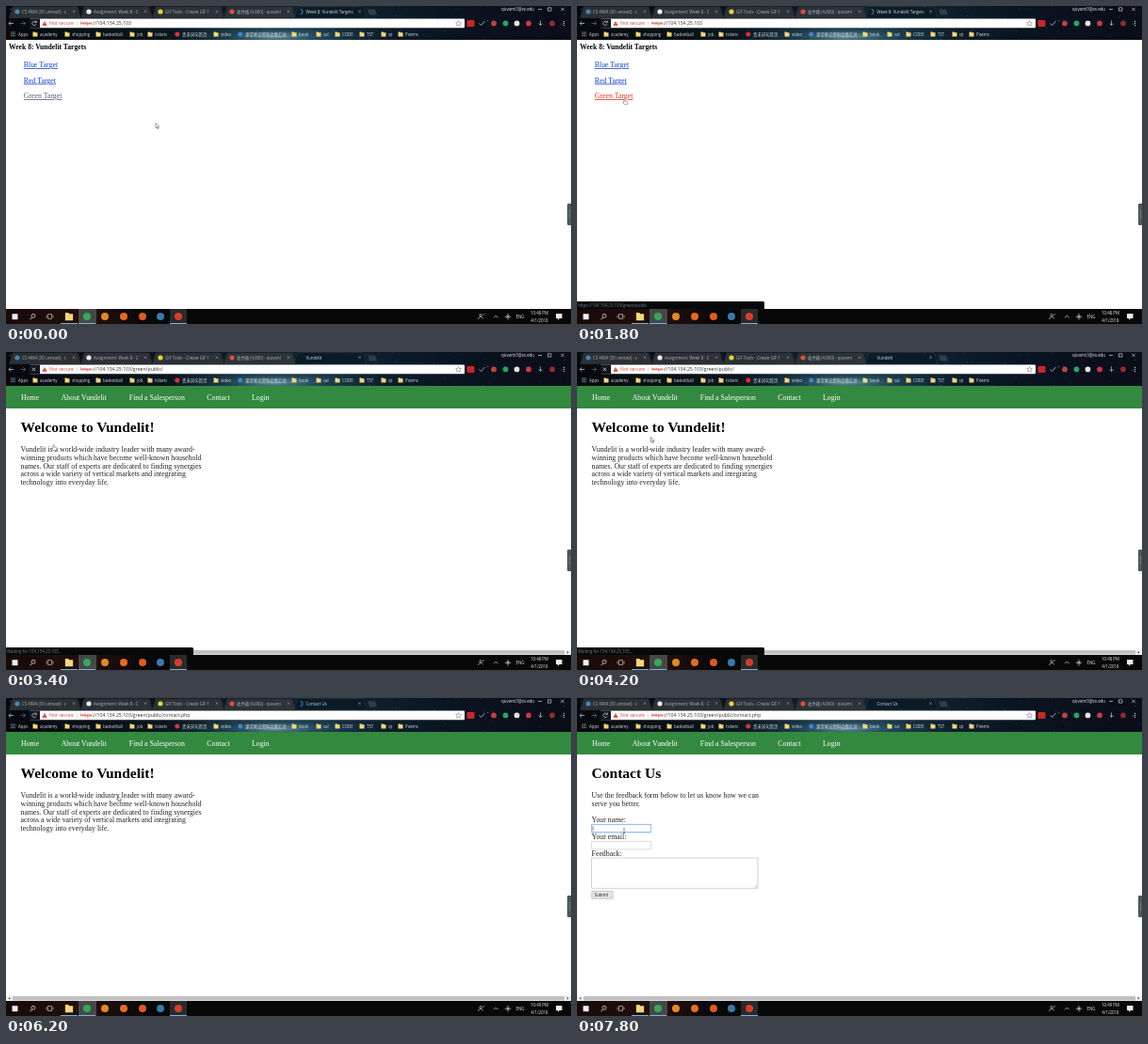
These frames come from a looping animation (600x338 px, 8000 ms). An HTML page:

```html
<!DOCTYPE html>
<html lang="en">
<head>
<meta charset="utf-8">
<title>Browser session</title>
<style>
html, body { margin: 0; width: 100%; height: 100%; overflow: hidden; background: #fff; }
svg { display: block; width: 100%; height: 100%; }
text { white-space: pre; }
.ui { font: 4.4px "Open Sans", "Noto Sans CJK SC", "Noto Sans CJK", sans-serif; }
.url { font-size: 5.15px; }
.serif { font: 7.82px "Liberation Serif", serif; fill: #222; }
.bold { font-weight: bold; fill: #000; }
.h1 { font-size: 15.5px; }
</style>
</head>
<body>
<svg id="stage" viewBox="0 0 600 338" preserveAspectRatio="none"></svg>
<script>
const LOOP = 8000, STEP = 200;
const BRAND = 'Vundelit', HOST = '104.154.25.103';
const stage = document.getElementById('stage');

const rect = (x, y, w, h, fill, more = '') =>
  `<rect x="${x}" y="${y}" width="${w}" height="${h}" fill="${fill}" ${more}/>`;
const dot = (x, y, r, fill, more = '') => `<circle cx="${x}" cy="${y}" r="${r}" fill="${fill}" ${more}/>`;
const line = (d, stroke, w = .7, more = '') =>
  `<path d="${d}" fill="none" stroke="${stroke}" stroke-width="${w}" ${more}/>`;
const label = (x, y, str, fill = '#d5d9dc', cls = 'ui', more = '') =>
  `<text x="${x}" y="${y}" class="${cls}" style="fill:${fill}" ${more}>${str}</text>`;
const serif = (x, y, str, cls = '', more = '') =>
  `<text x="${x}" y="${y}" class="serif ${cls}" ${more}>${str}</text>`;
const folder = (x, y, s = 1) =>
  `<path transform="translate(${x} ${y}) scale(${s})" d="M-2.5-2.5h2l.7.8h2.3v4.2h-5z" fill="#f3d77c"/>`;
const cross = (x, y, r, color, w = .6) =>
  line(`M${x - r} ${y - r}l${2 * r} ${2 * r}m0 ${-2 * r}l${-2 * r} ${2 * r}`, color, w);

let seed = 11;
const random = () => (seed = seed * 16807 % 2147483647) / 2147483647;

function sky() {
  let out = rect(0, 0, 600, 36, 'url(#night)') + rect(180, 0, 250, 36, 'url(#glow)');
  for (let i = 0; i < 130; i++)
    out += dot((random() * 600).toFixed(1), (random() * 36).toFixed(1),
      (.15 + random() * .4).toFixed(2), '#a9cfe0', `opacity="${(.2 + random() * .6).toFixed(2)}"`);
  return out;
}

function tabs() {
  const items = [
    ['CS 4984 (30 unread) - c', '#4a83b5'],
    ['Assignment: Week 8 - C', '#eeeeee'],
    ['GIF Tools - Create GIF f', '#e8d33c'],
    ['收件箱 (4,800) - quvami', '#d9503f']
  ];
  const shape = x => `M${x} 13l3.5-11.5q.4-1 1.5-1h67q1.1 0 1.5 1l3.5 11.5z`;
  return items.map(([title, color], i) => {
    const x = 3 + i * 76;
    return `<path d="${shape(x)}" fill="#30363b" fill-opacity=".88" stroke="#15191d" stroke-width=".5"/>` +
      dot(x + 9, 6, 2.6, color) + label(x + 14, 7.6, title, '#aeb4b7') + cross(x + 69, 5.8, 1.3, '#a5aaae', .5);
  }).join('') +
    `<path d="${shape(306)}" fill="#0b1a25" fill-opacity=".85" stroke="#34444e" stroke-width=".4"/>` +
    cross(375.5, 5.8, 1.3, '#aeb8be', .5) +
    `<path d="M384 3.5h8l2 6h-8z" fill="#49545b" opacity=".6"/>`;
}

function toolbar() {
  const badges = [[518, '#b5473f'], [530.5, '#27a463'], [542.5, '#e4e4e4'], [555, '#c83a45'], [580, '#8d2d35']];
  return label(526, 4.8, 'quvami3@zx.edu', '#eee') +
    line('M565 3.5h4M575.5 1.8h3.4v3.4h-3.4z', '#eee', .6) + cross(591, 3.5, 1.7, '#eee') +
    line('M8 18.5h-5m2.2-2.2l-2.2 2.2 2.2 2.2', '#cfd4d8') +
    line('M15.5 18.5h5m-2.2-2.2l2.2 2.2-2.2 2.2', '#6c747a') +
    rect(25, 13.5, 462, 9.8, '#fff', 'rx="1"') + rect(25, 13.5, 11, 9.8, '#10171d') +
    '<path d="M41 16l2.7 4.7h-5.4z" fill="#d23b30"/>' + line('M41 17.6v1.5', '#fff', .5) +
    label(46, 20.3, 'Not secure', '#d0453a', 'ui url') + line('M75.5 16v5', '#aaa', .4) +
    '<path d="M480.500 15.500l.9 2 2.100.2-1.600 1.400.5 2.100-1.900-1.100-1.900 1.100.5-2.100-1.600-1.400 2.100-.2z" fill="none" stroke="#666" stroke-width=".5"/>' +
    rect(489.5, 15, 8, 7, '#c62828', 'rx="1"') + line('M502.500 18.500l2 2 4-4.500', '#a7b2bb', .9) +
    badges.map(([x, c]) => dot(x, 18.4, 2.9, c)).join('') +
    line('M567.500 15.500v5m-2-2l2 2 2-2', '#8c969c', 1) +
    [-2, 0, 2].map(d => dot(592.5, 18.4 + d, .55, '#ddd')).join('');
}

function bookmarks() {
  const items = [[36, 'academy'], [70, 'shopping'], [103, 'basketball'], [139, 'job'], [158, 'tickets'],
    [187, '青禾词句首页', '#d23535'], [228, 'video'], [254, '课堂笔记资料合集汇总', '#3f83cf'],
    [311, 'book'], [337, 'cal'], [357, 'CODE'], [383, 'TST'], [406, 'qt'], [424, 'Poems']];
  let out = label(13, 31.5, 'Apps');
  for (let i = 0; i < 9; i++)
    out += rect(5 + i % 3 * 1.8, 27.4 + Math.floor(i / 3) * 1.8, 1.2, 1.2, ['#d94b40', '#58a55c', '#4a88d9'][i % 3]);
  return out + items.map(([x, name, logo]) =>
    (logo ? dot(x - 5.2, 30, 2.5, logo) : folder(x - 5, 30)) + label(x, 31.5, name)).join('');
}

function taskbar() {
  const logos = [[105, '#e08a2b'], [125, '#e66a26'], [145, '#dd5a2b'], [164, '#3d78a8'], [183, '#d2402d']];
  return rect(0, 322, 600, 16, '#080808') + rect(0, 322, 150, 16, 'url(#ember)') +
    rect(77, 322, 19, 16, '#454849') + rect(174, 322, 18, 16, '#2a2a2b') +
    rect(6.5, 327.2, 6, 6, '#eee') +
    dot(29, 329.3, 2, 'none', 'stroke="#eee" stroke-width=".7"') + line('M27.5 331l-2 2.300', '#eee', .8) +
    line('M44.500 327.500h4v5h-4zM43 328.500v3M50 328.500v3', '#ddd', .6) + folder(67, 330, 1.65) +
    dot(86, 330, 4, '#3ca55c') + logos.map(([x, c]) => dot(x, 330, 4, c)).join('') +
    [58, 77, 174].map(x => rect(x, 337, 18, 1, '#7eb2d8')).join('') +
    dot(504, 328.7, 1.2, 'none', 'stroke="#ddd" stroke-width=".6"') +
    line('M501.500 333q.3-2.600 2.500-2.600t2.500 2m-.5-3.900l2-1', '#ddd', .6) +
    line('M518 331.300l2.300-2.300 2.300 2.300', '#ddd') +
    line('M533 326.800v6.800M529.700 330.200h6.600M531.500 328.700l3 3m0-3l-3 3', '#ccc', .7) +
    label(541.5, 331.8, 'ENG', '#eee') + label(566.500, 335.6, '4/1/2018', '#eee', 'ui', 'text-anchor="middle"') +
    '<path d="M584 327h6.500v5h-2.800l-1.700 1.900v-1.900h-2z" fill="#eee"/>';
}

function targets() {
  return serif(3, 45.6, `Week 8: ${BRAND} Targets`, 'bold', 'style="font-size:7.65px"') +
    [['Blue', '#0b3fd0'], ['Red', '#0b3fd0'], ['Green', '#5b5470']].map(([name, color], i) =>
      serif(18.8, 65 + i * 16.600, `${name} Target`, '',
        `id="link${name}" text-decoration="underline" style="fill:${color}"`)).join('');
}

function navBar() {
  return rect(0, 36, 600, 24, '#33893f') +
    [[16, 'Home'], [58.7, 'About ' + BRAND], [130.8, 'Find a Salesperson'], [213.3, 'Contact'], [261, 'Login']]
      .map(([x, name]) => serif(x, 51, name, '', 'style="fill:#fff"')).join('') +
    `<g id="navHover">${line('M213.300 52.300h24.500', '#fff', .5)}</g>` +
    rect(0, 316.500, 600, 5.500, '#f0f0f0') + rect(7, 317, 586, 4.500, '#c1c1c1') +
    '<path d="M4.300 317.800v3l-1.900-1.500zM595.700 317.800v3l1.900-1.500z" fill="#555"/>';
}

const paragraph = lines => lines.map((str, i) => serif(15.600, 106 + i * 8.78, str)).join('');

function welcome() {
  return serif(15.600, 85.200, `Welcome to ${BRAND}!`, 'bold h1') + paragraph([
    `${BRAND} is a world-wide industry leader with many award-`,
    'winning products which have become well-known household',
    'names. Our staff of experts are dedicated to finding synergies',
    'across a wide variety of vertical markets and integrating',
    'technology into everyday life.']);
}

function contact() {
  const box = (y, w, h, stroke) => rect(15.700, y, w, h, '#fff', `stroke="${stroke}" stroke-width=".6"`);
  return serif(15.600, 85.200, 'Contact Us', 'bold h1') + paragraph([
    'Use the feedback form below to let us know how we can', 'serve you better.']) +
    serif(15.600, 131.500, 'Your name:') + box(134.500, 62.600, 8.200, '#5b9be8') +
    rect(15.300, 134.100, 63.400, 9, 'none', 'stroke="#8fbcf2" stroke-width=".5"') +
    line('M17 136v5.200', '#222', .5) +
    serif(15.600, 149.800, 'Your email:') + box(152.700, 62.600, 8.200, '#c4c4c4') +
    serif(15.600, 168, 'Feedback:') + box(170, 176.300, 32.200, '#b5b5b5') +
    line('M188.500 201.500l2.800-2.800m-1.300 2.800l1.300-1.300', '#777', .4) +
    rect(15.700, 205.300, 22.300, 8, '#e6e6e6', 'stroke="#aaa" stroke-width=".6" rx=".6"') +
    label(18.500, 211.100, 'Submit', '#111', 'ui', 'style="font:5.200px Liberation Sans,sans-serif"');
}

const pointers = {
  arrow: '<path d="M0 0v5.400l1.300-1.200.9 1.900.8-.4-.9-1.800h1.700z" fill="#fff" stroke="#222" stroke-width=".45"/>',
  hand: '<path d="M0 0q.8-.6 1 .3v2l2.300.5q.7.200.6 1l-.5 2.400h-3l-1.900-2.300q.1-.8.900-.3l.6.4z" fill="#fff" stroke="#333" stroke-width=".4"/>',
  beam: line('M-1 -.2h2M0-.2v4.700M-1 4.500h2', '#333', .5)
};

stage.innerHTML = `
<defs>
  <linearGradient id="night"><stop stop-color="#06090d"/><stop offset=".3" stop-color="#0a161f"/>
    <stop offset=".55" stop-color="#102635"/><stop offset=".8" stop-color="#0a1320"/><stop offset="1" stop-color="#0b0d18"/></linearGradient>
  <radialGradient id="glow" cx=".42" cy=".9" r=".5"><stop stop-color="#8dbfca" stop-opacity=".75"/>
    <stop offset=".35" stop-color="#3a7185" stop-opacity=".5"/><stop offset="1" stop-color="#153040" stop-opacity="0"/></radialGradient>
  <linearGradient id="ember"><stop stop-color="#170a08"/><stop offset=".6" stop-color="#24100c"/><stop offset="1" stop-color="#080808"/></linearGradient>
</defs>
${rect(0, 0, 600, 338, '#fff') + sky() + tabs() + toolbar() + bookmarks() + taskbar()}
<g id="spinner">${line('M0-2.600a2.600 2.600 0 0 1 0 5.200', '#5fa6cf', .8)}</g>
${label(318.500, 7.600, '', '#d5dce0', 'ui', 'id="title"')}
<g id="reload">${line('M32 17.300a2.200 2.200 0 1 0 .1 2M32.300 15.600v2h-2', '#cfd4d8')}</g>
<g id="stop">${cross(29.500, 18.400, 1.700, '#d8dde0', .8)}</g>
<text x="79" y="20.300" class="ui url" fill="#333"><tspan fill="#d0453a" text-decoration="line-through">https</tspan><tspan id="address"></tspan></text>
<g id="targets">${targets()}</g>
<g id="site">${navBar()}<g id="welcome">${welcome()}</g><g id="contact">${contact()}</g></g>
<g id="status"><path d="M0 314h197.500q1.500 0 1.500 1.500v6.500h-199z" fill="#06080a"/>${label(1, 319.800, '', '#74828a', 'ui', 'id="statusText"')}</g>
${label(566.500, 328.300, '', '#eee', 'ui', 'id="clock" text-anchor="middle"')}
${rect(596, 210, 5, 23, '#4b5a59', 'rx="1.200"') + line('M598.500 217v9', '#9aa9a6', .7, 'stroke-dasharray="1 .7"')}
<g id="pointer"></g>`;

const ui = Object.fromEntries([...stage.querySelectorAll('[id]')].map(node => [node.id, node]));
const path = [[0, 159, 124.500], [600, 159, 124.500], [1400, 50, 98.500], [4000, 50, 98.500], [4800, 232, 48],
  [5400, 232, 48], [6200, 119, 104.500], [6600, 119, 104.500], [7400, 50, 139], [LOOP, 50, 139]];
const statuses = [[0, ''], [1400, `https://${HOST}/green/public`], [2000, `Waiting for ${HOST}...`],
  [4800, `https://${HOST}/green/public/contact.php`], [5600, `Waiting for ${HOST}...`], [6000, '']];
const titles = [[0, `Week 8: ${BRAND} Targets`], [3000, BRAND], [6000, 'Contact Us']];
const addresses = [[0, ''], [3000, '/green/public/'], [6000, '/green/public/contact.php']];
const shapes = [[0, 'arrow'], [1400, 'hand'], [4000, 'arrow'], [4800, 'hand'], [5600, 'arrow'], [7400, 'beam']];

const pick = (table, t) => table.findLast(([start]) => start <= t)[1];
const within = (t, from, to) => t >= from && t < to;
const show = (node, on) => node.setAttribute('display', on ? 'inline' : 'none');
const write = (node, str) => { if (node.textContent !== str) node.textContent = str; };

function position(t) {
  const i = path.findIndex(([end]) => end > t);
  const [t0, x0, y0] = path[i - 1], [t1, x1, y1] = path[i];
  const k = (t - t0) / (t1 - t0), ease = k * k * (3 - 2 * k);
  return [x0 + (x1 - x0) * ease, y0 + (y1 - y0) * ease];
}

let shown = -1;
function draw(now) {
  const t = Math.floor(now % LOOP / STEP) * STEP;
  if (t !== shown) {
    shown = t;
    const status = pick(statuses, t), loading = within(t, 2000, 5600);
    show(ui.targets, t < 3000);
    show(ui.site, t >= 3000);
    show(ui.welcome, t < 6800);
    show(ui.contact, t >= 6800);
    show(ui.navHover, within(t, 4800, 5600));
    show(ui.status, status);
    show(ui.stop, loading);
    show(ui.reload, !loading);
    show(ui.spinner, t < 3000 || within(t, 5400, 6800));
    ui.spinner.setAttribute('transform', `translate(312.500 6) rotate(${within(t, 2000, 3000) ? t * .45 : 0})`);
    ui.linkGreen.style.fill = within(t, 1600, 2000) ? '#e0301e' : '#5b5470';
    write(ui.statusText, status);
    write(ui.title, pick(titles, t));
    write(ui.address, `://${HOST}${pick(addresses, t)}`);
    write(ui.clock, t < 4400 ? '10:48 PM' : '10:49 PM');
    ui.pointer.innerHTML = pointers[pick(shapes, t)];
    ui.pointer.setAttribute('transform', `translate(${position(t)})`);
  }
  requestAnimationFrame(() => draw(performance.now()));
}
draw(performance.now());
</script>
</body>
</html>
```
